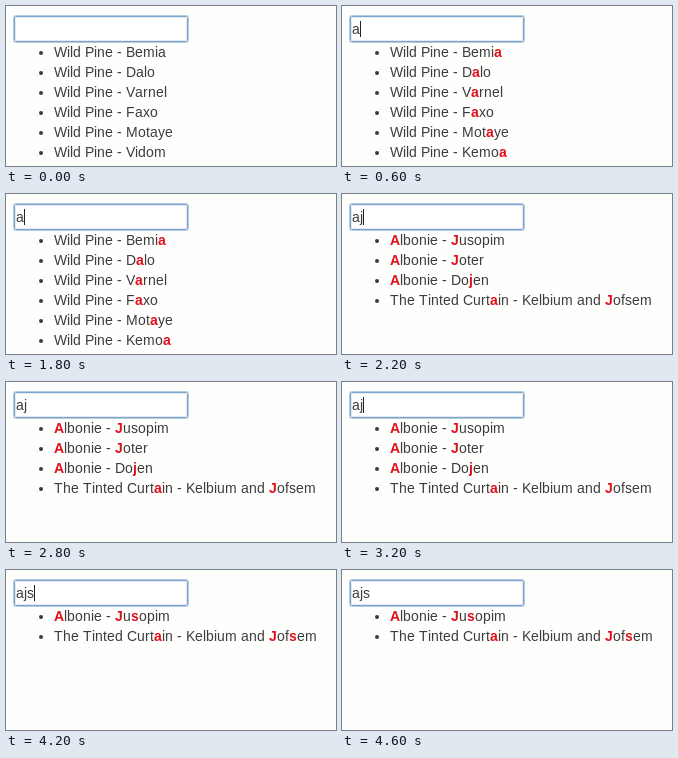
An HTML page with a canvas for the animation above (5 s loop, 330 px wide and 160 px high).

```html
<!DOCTYPE html>
<html lang="en">
<head>
<meta charset="utf-8">
<title>Fuzzy search</title>
<style>
  html, body { margin: 0; width: 100%; height: 100%; overflow: hidden; background: #fefefc; }
  canvas { display: block; }
</style>
</head>
<body>
<canvas id="stage" width="330" height="160"></canvas>
<script>
const ctx = document.getElementById('stage').getContext('2d');
const LOOP = 5000;
const FAMILY = '14px "Liberation Sans", Arial, sans-serif';
const PAPER = '#fefefc';
const INK = '#3c3c3c';
const HIT = '#e0101c';
const MAX_ROWS = 6;

const group = (title, names) => names.map(name => `${title} - ${name}`);
const items = [
  ...group('Wild Pine', ['Bemia', 'Dalo', 'Varnel', 'Faxo', 'Motaye', 'Vidom', 'Kemoa']),
  ...group('Albonie', ['Jusopim', 'Joter', 'Dojen']),
  'The Tinted Curtain - Kelbium and Jofsem'
];

// Each track lists [start time, value]
const typed = [[0, ''], [600, 'a'], [2200, 'aj'], [4000, 'ajs']];
const filter = [[0, ''], [600, 'a'], [2200, 'aj'], [4200, 'ajs']];
const caret = [[0, false], [200, true], [1200, false], [1800, true], [2800, false],
               [3200, true], [3800, false], [4000, true], [4600, false]];

const valueAt = (track, t) => track.filter(([start]) => start <= t).pop()[1];

// Indices of the query letters found in order, or null
function match(text, query) {
  const hits = [];
  let from = 0;
  for (const letter of query) {
    const i = text.toLowerCase().indexOf(letter, from);
    if (i < 0) return null;
    hits.push(i);
    from = i + 1;
  }
  return hits;
}

// Draws with whole-pixel advances and returns the end position
function drawText(text, x, y, hits = []) {
  [...text].forEach((char, i) => {
    const hit = hits.includes(i);
    ctx.font = (hit ? 'bold ' : '') + FAMILY;
    ctx.fillStyle = hit ? HIT : INK;
    ctx.fillText(char, x, y);
    x += Math.round(ctx.measureText(char).width);
  });
  return x;
}

// One-pixel frame, inset from the input's edge
function drawFrame(inset, color, radius) {
  const d = inset + 0.5;
  ctx.strokeStyle = color;
  ctx.beginPath();
  ctx.roundRect(8 + d, 10 + d, 174 - 2 * d, 26 - 2 * d, radius);
  ctx.stroke();
}

function drawInput(text, showCaret) {
  ctx.fillStyle = '#fff';
  ctx.fillRect(8, 10, 174, 26);
  ctx.lineWidth = 1;
  drawFrame(1, '#e2ebf3', 0);
  drawFrame(-1, '#b4cce3', 2);
  drawFrame(0, '#7ba3cc', 1);
  const end = drawText(text, 10, 28);
  if (showCaret) {
    ctx.fillStyle = '#222';
    ctx.fillRect(end, 15, 1, 16);
  }
}

function drawList(query) {
  items
    .map(text => ({ text, hits: match(text, query) }))
    .filter(row => row.hits)
    .slice(0, MAX_ROWS)
    .forEach(({ text, hits }, i) => {
      const y = 51 + i * 20;
      ctx.fillStyle = INK;
      ctx.beginPath();
      ctx.arc(35, y - 4, 2, 0, Math.PI * 2);
      ctx.fill();
      drawText(text, 48, y, hits);
    });
}

const began = performance.now();

function draw() {
  const t = (performance.now() - began) % LOOP;
  ctx.fillStyle = PAPER;
  ctx.fillRect(0, 0, 330, 160);
  drawInput(valueAt(typed, t), valueAt(caret, t));
  drawList(valueAt(filter, t));
  requestAnimationFrame(draw);
}
draw();
</script>
</body>
</html>
```
